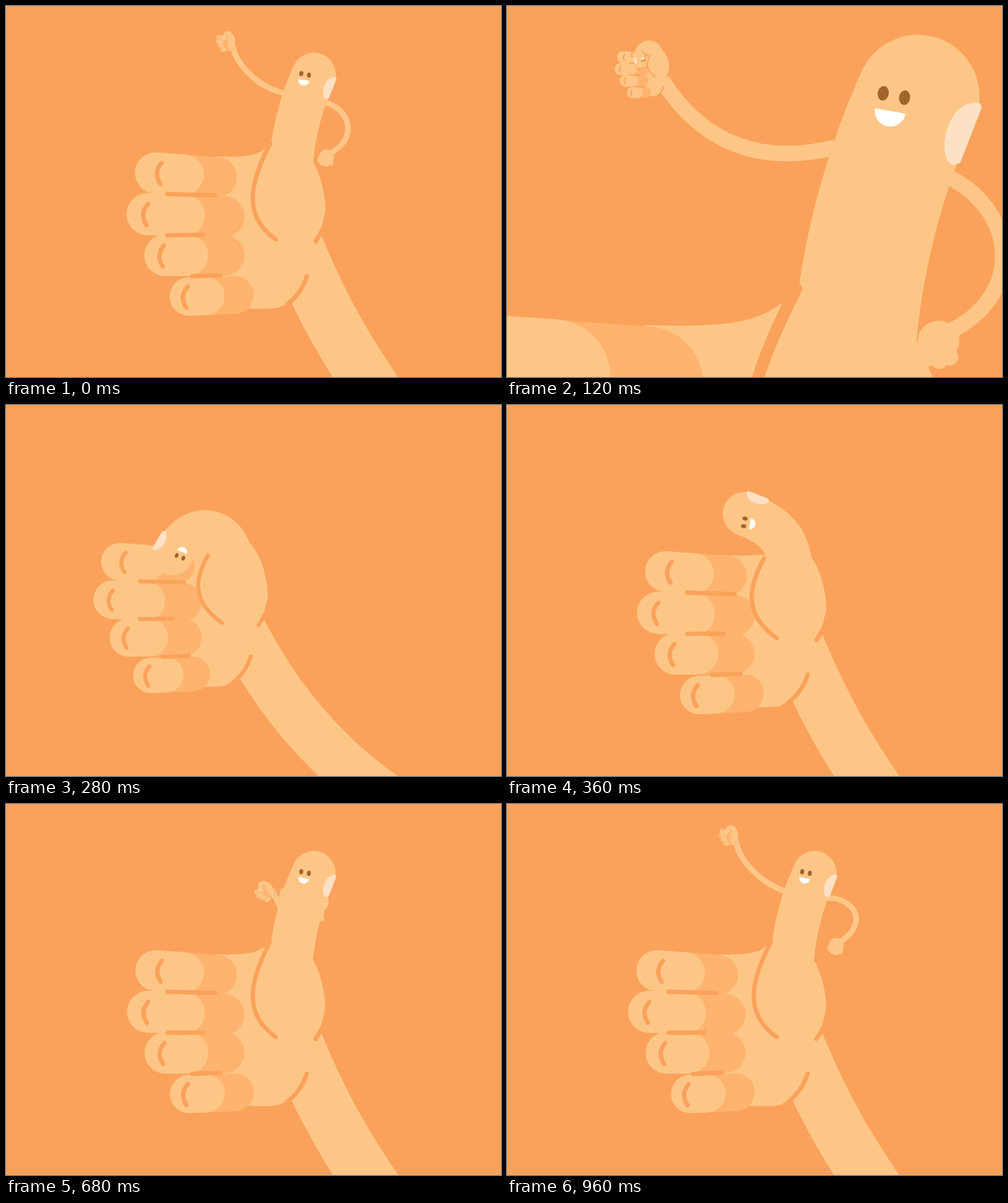
An HTML page with a canvas for the animation above (1000 ms loop, 800 by 600 pixels).

```html
<!DOCTYPE html>
<html lang="en">
<head>
<meta charset="utf-8">
<title>Endless thumbs up</title>
<style>
  html, body { margin: 0; width: 100%; height: 100%; overflow: hidden; background: #faa25b; }
  canvas { display: block; }
</style>
</head>
<body>
<canvas id="stage" width="800" height="600"></canvas>
<script>
const ctx = document.getElementById('stage').getContext('2d');
const BG = '#faa25b', SKIN = '#fec686', SHADE = '#feb46e', NAIL = '#fee0c4', EYE = '#a1642b';
const LOOP = 1000, STEP = 40, HANDOVER = 360, ARMS = 600;
const ZOOM = 1 / 0.1025;       // big hand to small fist
const WRIST = [470, 390];

// Left wrist: x, y and the angle at which the arm leaves it.
const TUCKED = [470, 145, 30], LOW = [355, 129, 30], HIGH = [369, 56, 8], SIDE = [349.2, 101, 32];
// Right arm: curve from shoulder to wrist.
const HIDDEN = Array(4).fill([485, 150]).flat();
const FLUNG = [512, 149, 562, 132, 605, 172, 552, 209];
const ON_HIP = [513, 157, 553, 175, 560, 225, 515, 247];

const FINGERS = [
  { x: 242, r: 33, light: 45, dark: 99, crease: 261, length: 77 },
  { x: 229.5, r: 34, light: 58, dark: 122.5, crease: 261, length: 58 },
  { x: 257.5, r: 33.5, light: 36, dark: 95, crease: 301, length: 46 },
  { x: 296, r: 31, light: 26.5, dark: 74 }
];

const clamp = (v, lo, hi) => Math.min(hi, Math.max(lo, v));
const rad = degrees => degrees * Math.PI / 180;
const mix = (a, b, k) => a.map((v, i) => v + (b[i] - v) * k);
const smooth = (t, from, to) => {
  const u = clamp((t - from) / (to - from), 0, 1);
  return u * u * (3 - 2 * u);
};

function fill(path, color) {
  ctx.fillStyle = color;
  ctx.fill(new Path2D(path));
}
function line(path, width = 7, color = BG) {
  ctx.lineWidth = width;
  ctx.strokeStyle = color;
  ctx.stroke(new Path2D(path));
}
function oval(x, y, rx, ry, color, angle = 0) {
  ctx.beginPath();
  ctx.ellipse(x, y, rx, ry, angle, 0, Math.PI * 2);
  ctx.fillStyle = color;
  ctx.fill();
}
// Draws with the point "from" placed on x, y.
function place(x, y, angle, scale, from, draw) {
  ctx.save();
  ctx.translate(x, y);
  ctx.rotate(rad(angle));
  ctx.scale(scale, scale);
  ctx.translate(-from[0], -from[1]);
  draw();
  ctx.restore();
}

function rightArm(t) {
  const arm = mix(mix(HIDDEN, FLUNG, smooth(t, ARMS, 800)), ON_HIP, smooth(t, 900, 1045));
  const x = arm[6] - 6, y = arm[7] + 5;
  line(`M${arm[0]} ${arm[1]}C${arm.slice(2)}`, 9, SKIN);
  oval(x, y, 12, 11.5, SKIN);
  for (let i = 0; i < 4; i++) {
    const a = rad(152 - 32 * i);
    oval(x + 11.5 * Math.cos(a), y + 11.5 * Math.sin(a), 4.8, 4.8, SKIN);
  }
}

function leftArm(t) {
  const out = mix(TUCKED, LOW, smooth(t, ARMS, 800));
  const [x, y, lean] = mix(mix(out, HIGH, smooth(t, 800, 960)), SIDE, smooth(t, 960, 1120));
  const a = rad(lean - 10 * smooth(t, 1200, HANDOVER + LOOP));
  line(`M${x} ${y}C${x + 36 * Math.sin(a)} ${y + 36 * Math.cos(a)}` +
    ` ${x + (448 - x) * 0.5} ${92 + 0.6 * y} 448 141`, 9, SKIN);
  place(x, y, Math.min(0, 103 - y), 1 / ZOOM, WRIST, () => hand(t - LOOP));
}

function fingers(t) {
  const each = draw => FINGERS.forEach((finger, i) => {
    const shift = 14.5 * (1 - smooth(t - 31 * i, 340, 580));
    draw(finger, i, finger.x + shift, 269.5 + 66.5 * i, 0.07 - 0.036 * i, shift);
  });
  each((f, i, x, y, tilt) =>
    line(`M${x + f.light} ${y + tilt * f.light}L${x + f.dark} ${y + tilt * f.dark}`, 2 * f.r - 1, SHADE));
  each((f, i, x, y, tilt) => {
    line(`M${x} ${y}l${f.light} ${tilt * f.light}`, 2 * f.r, SKIN);
    line(`M${x - 3 + 13 / (i + 1) ** 2} ${y - 16}q-14 16 -2 34`);
  });
  each((f, i, x, y, tilt, shift) => {
    if (f.crease) line(`M${f.crease + 2.1 * shift} ${303.5 + 66.5 * i}l${f.length} ${(tilt - 0.04) * f.length}`);
  });
}

function face() {
  fill('M529 113.5C515 114 508 135 513 147Q516 151 520.5 148L532.5 117Q533 113 529 113.5Z', NAIL);
  oval(476, 108.2, 3.2, 4.2, EYE, 0.15);
  oval(488.3, 110.7, 3.2, 4.2, EYE, 0.15);
  fill('M471.3 116.8L488.9 120A8.9 8.9 0 0 1 471.3 116.8Z', '#fff');
}

// The thumb is a thick line that bends most in its middle.
function thumb(curl) {
  const steps = 32, length = 184 + 28 * curl - 190 * curl * (1 - curl);
  let x = 459 - 9 * curl ** 3, y = 290, path = `M${x} ${y}`;
  for (let i = 0; i < steps; i++) {
    const u = (i + 0.5) / steps, a = rad(24 * u - 210 * curl * smooth(u, 0, 1));
    x += Math.sin(a) * length / steps;
    y -= Math.cos(a) * length / steps;
    path += `L${x} ${y}`;
  }
  line(path, 71, SKIN);
  if (curl > 0.85) {
    line('M309 232Q305 250 306 269M334 337Q358 340 374 326');
    line('M369 237Q376 246 383 258L398 260M384 258Q388 275 378 292');
  }
  place(x, y, -210 * curl, 1, [496, 110], face);
}

function hand(t) {
  const curl = 0.48 + 0.52 * Math.cos(Math.PI * clamp(t - 190, 0, 360) / 320);
  const bend = Math.sqrt(Math.max(0, curl)), vx = 427 - 18 * bend, vy = 222 + 40 * bend;
  if (t > ARMS) {
    rightArm(t);
    leftArm(t);
  }
  fill(`M340 243C395 245 412 240 ${vx} ${Math.min(vy, 244)}L431 232L460 260L484 236` +
    'C505 258 516 300 516 330Q511 358 500 381L490 430Q476 472 440 487Q420 490 390 488L340 480Z', SKIN);
  fingers(t);
  thumb(curl);
  line(`M${vx} ${vy}C${vx / 2 + 187} ${vy / 2 + 164} 376 335 436 377`);
  line('M500 380Q506 372 510 363');
  line('M486 436Q477 464 455 481');
}

// The view grows around a point that drifts to where fist and hand coincide.
function camera(t) {
  const u = clamp((t - 993) / 376, 0, 1), p = u * u / (u * u + (1 - u) ** 2);
  const scale = 1 + (ZOOM - 1) * p;
  const [fx, fy] = WRIST.map((w, i) => (SIDE[i] * ZOOM - w) / (ZOOM - 1));
  const x = fx + 76.5 * (1 - p ** 1.5), y = fy + 96 * (1 - p) ** 6;
  ctx.setTransform(scale, 0, 0, scale, (1 - scale) * x, (1 - scale) * y);
}

function draw(time) {
  const now = Math.floor(time % LOOP / STEP) * STEP;
  const t = now < HANDOVER ? now + LOOP : now;
  ctx.setTransform(1, 0, 0, 1, 0, 0);
  ctx.fillStyle = BG;
  ctx.fillRect(0, 0, 800, 600);
  ctx.lineCap = ctx.lineJoin = 'round';
  camera(t);
  line(`M${WRIST}Q517 505 581 600L640 690`, 88, SKIN);
  hand(t);
}

let start;
function tick(time) {
  start ??= time;
  draw(time - start);
  requestAnimationFrame(tick);
}
draw(0);
requestAnimationFrame(tick);
</script>
</body>
</html>
```
